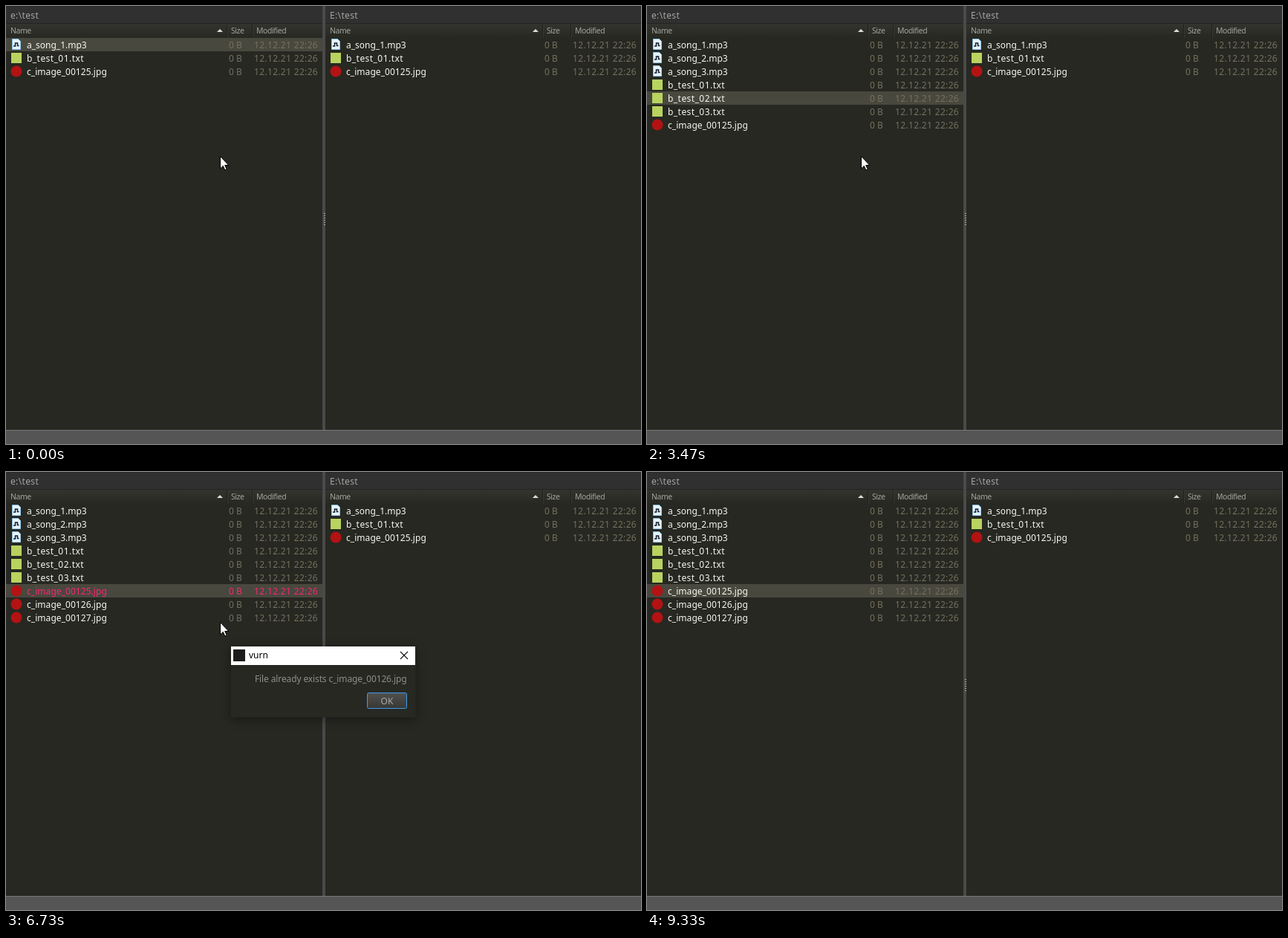
Animation, 855 px wide and 590 px high, one loop 9790 ms. Source, as an HTML page:

```html
<!DOCTYPE html>
<html lang="en">
<head>
<meta charset="utf-8">
<title>Duplicating files</title>
<style>
  html, body { margin: 0; width: 100%; height: 100%; overflow: hidden; background: #272822; }
  svg { display: block; }
  text { font: 12px "Noto Sans", "Open Sans", sans-serif; white-space: pre; }
  .head { font-size: 10.5px; letter-spacing: -.45px; fill: #a3a39b; }
  .path { letter-spacing: .35px; fill: #a5a5a2; }
  .name { fill: #f8f8f2; }
  .dim { fill: #75715e; }
  .date { letter-spacing: .33px; }
  .marked text { fill: #f92672; }
  .shadow { filter: drop-shadow(0 3px 7px rgba(0, 0, 0, .4)); }
</style>
</head>
<body>
<svg width="855" height="590" viewBox="0 0 855 590">
  <defs>
    <linearGradient id="headFill" x2="0" y2="1">
      <stop stop-color="#33342e"/><stop offset="1" stop-color="#272822"/>
    </linearGradient>
    <linearGradient id="buttonFill" x2="0" y2="1">
      <stop stop-color="#50514e"/><stop offset="1" stop-color="#373836"/>
    </linearGradient>
    <g id="mp3">
      <path d="M2.5 .5h8l3 3v11h-11z" fill="#e4f3fd" stroke="#8fc4e8"/>
      <path d="M4 10h2.5V6h3v3.500h2" fill="none" stroke="#111c28" stroke-width="1.500"/>
    </g>
    <rect id="txt" x="1" y="1" width="14" height="14" fill="#b9d35f"/>
    <circle id="jpg" cx="8" cy="8" r="7.500" fill="#b31313"/>
  </defs>
  <rect width="855" height="590" fill="#272822"/>
  <g id="panes"></g>
  <g id="leftRows"></g>
  <g id="rightRows" transform="translate(430)"></g>
  <rect x="426" width="4" height="571" fill="#4a4a4a"/>
  <path d="M429 279v18" stroke="#a8a8a8" stroke-width="2" stroke-dasharray="1 2"/>
  <rect y="571" width="855" height="19" fill="#555"/>
  <rect y="571" width="855" height="1" fill="#777"/>
  <g id="dialog">
    <rect class="shadow" x="303" y="235" width="248.500" height="95.500" fill="#272822"/>
    <rect x="303" y="235" width="248" height="25" fill="#fff"/>
    <rect x="306" y="239" width="16" height="16" fill="#1c1c1a"/>
    <text x="327" y="251" fill="#000">vurn</text>
    <path d="M531 242l10 10m0-10l-10 10" stroke="#111" stroke-width="1.100"/>
    <text x="335" y="283" fill="#8f8f86" letter-spacing="-.12">File already exists c_image_00126.jpg</text>
    <rect x="486.500" y="297.500" width="53" height="21" rx="2" fill="url(#buttonFill)" stroke="#3f9bea"/>
    <text x="513" y="313" text-anchor="middle" fill="#a8a8a5">OK</text>
  </g>
  <path id="mouse" d="M0 0V16.500L3.800 12.900L6.300 18.500L8.700 17.400L6.200 12H11.300Z" fill="#fff" stroke="#000"/>
</svg>
<script>
const LOOP = 9790, TICK = 1000 / 15;
const $ = id => document.getElementById(id);

// [name, time it appears]
const files = [
  ['a_song_1.mp3', 0], ['a_song_2.mp3', 600], ['a_song_3.mp3', 1530],
  ['b_test_01.txt', 0], ['b_test_02.txt', 2670], ['b_test_03.txt', 3470],
  ['c_image_00125.jpg', 0], ['c_image_00126.jpg', 4470], ['c_image_00127.jpg', 5400]
];
// [time, highlighted row]
const moves = [
  [0, 0], [870, 1], [1800, 2], [2130, 3], [3000, 4], [3670, 5],
  [3870, 6], [4600, 7], [5530, 8], [5870, 7], [6070, 6]
];
// [from, to] while the highlighted row is marked
const marks = [
  [70, 600], [1070, 1530], [2330, 2670], [3130, 3470],
  [4070, 4470], [5000, 5400], [6330, 8800]
];
const dialogTime = [6730, 8670];
const spacing = { mp3: 0, txt: .45, jpg: .05 };

const within = (t, [from, to]) => t >= from && t < to;
const label = (x, y, cls, text, extra = '') =>
  `<text x="${x}" y="${y}" class="${cls}" ${extra}>${text}</text>`;

// The right pane's size and date columns sit 5 and 1 px further left.
function pane(x, path, sizeX, dateX) {
  const line = (at, color) => `<rect x="${at}" y="24" width="1" height="19" fill="${color}"/>`;
  const divider = at => line(at, '#20211c') + line(at + 1, '#383933');
  return `<g transform="translate(${x})">
    <rect width="426" height="24" fill="#303030"/>
    <rect width="426" height="1" fill="#262626"/>
    <rect y="23" width="426" height="1" fill="#242521"/>
    <rect y="24" width="426" height="19" fill="url(#headFill)"/>
    ${divider(sizeX - 6)}${divider(dateX - 6)}
    <path d="M${sizeX - 19} 35l4-4l4 4z" fill="#ddd"/>
    ${label(6, 17, 'path', path)}${label(6, 37, 'head', 'Name')}
    ${label(sizeX, 37, 'head', 'Size')}${label(dateX, 37, 'head', 'Modified')}
  </g>`;
}

function row(name, i, sizeX, dateX, active, marked) {
  const kind = name.slice(-3);
  return `<g transform="translate(0 ${43 + 18 * i})" class="${marked ? 'marked' : ''}">
    ${active ? '<rect width="426" height="18" fill="#49483e"/>' : ''}
    <use href="#${kind}" x="6" y="1"/>
    ${label(28, 14, 'name', name, `letter-spacing="${spacing[kind]}"`)}
    ${label(sizeX, 14, 'dim', '0 B')}
    ${label(dateX, 14, 'dim date', '12.12.21 22:26')}
  </g>`;
}

function mouseAt(t) {
  const step = Math.floor((t + 4) / TICK);
  const mix = (a, b, p) => a + (b - a) * p;
  if (step < 118) return [288.5, 202.5];
  if (step < 134) {
    const p = Math.min(1, (step - 118) / 9), e = p * p * (3 - 2 * p);
    return [mix(310.5, 494.5, e), mix(238.5, 305.5, e)];
  }
  if (step >= 140) return null;
  const e = ((step - 133) / 6) ** 1.5;
  return [mix(494.5, 91.5, e), mix(305.5, 577.5, e)];
}

let shown = '';
function draw(t) {
  const active = moves.filter(m => m[0] <= t).pop()[1];
  const marked = marks.some(m => within(t, m));
  const rows = files.filter(f => f[1] <= t)
    .map(([name], i) => row(name, i, 300, 334, i === active, marked && i === active)).join('');
  if (rows !== shown) $('leftRows').innerHTML = shown = rows;

  $('dialog').style.display = within(t, dialogTime) ? '' : 'none';
  const spot = mouseAt(t);
  $('mouse').style.display = spot ? '' : 'none';
  if (spot) $('mouse').setAttribute('transform', `translate(${spot})`);
}

$('panes').innerHTML = pane(0, 'e:\\test', 303, 337) + pane(430, 'E:\\test', 298, 336);
$('rightRows').innerHTML = files.filter(f => !f[1])
  .map(([name], i) => row(name, i, 295, 333)).join('');

const start = performance.now();
function frame() {
  draw((performance.now() - start) % LOOP);
  requestAnimationFrame(frame);
}
frame();
</script>
</body>
</html>
```
